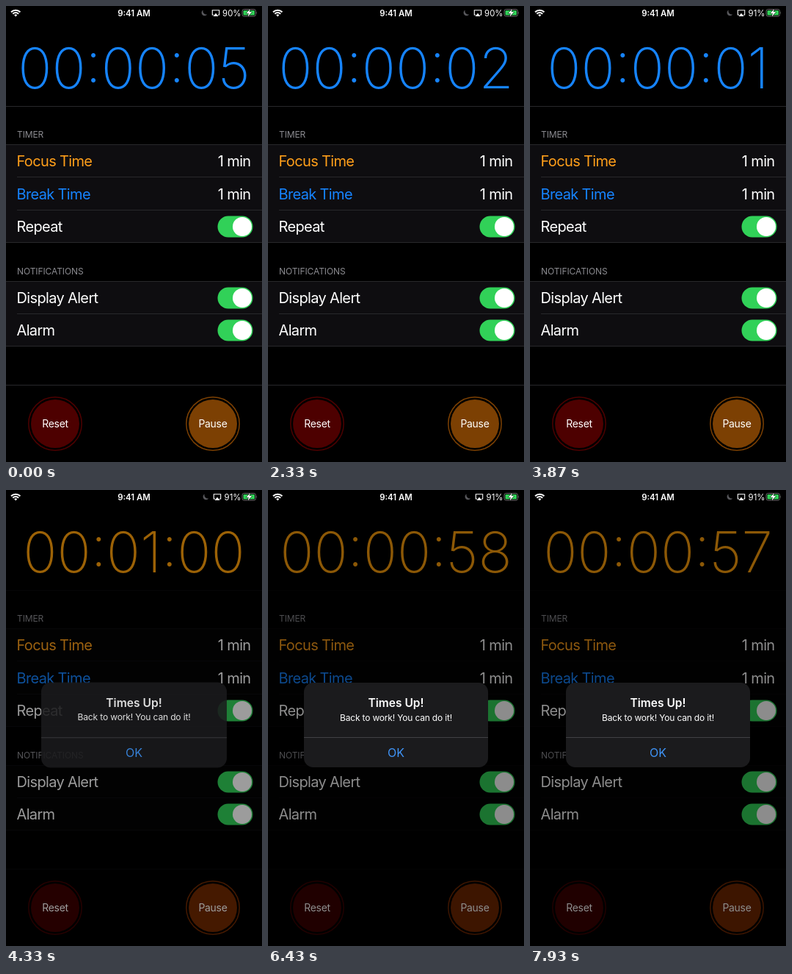
Write an HTML page that moves like this. It is 349 by 620 pixels and loops after 8 s.

```html
<!DOCTYPE html>
<html lang="en">
<head>
<meta charset="utf-8">
<title>Focus timer</title>
<style>
  html, body { margin: 0; height: 100%; background: #000; overflow: hidden; }
  svg { --shown: 0; display: block; width: 349px; height: 620px; font-family: Inter, Roboto, sans-serif; fill: #fff; }
  .middle { text-anchor: middle; }
  .end { text-anchor: end; }
  .row { font-size: 20px; letter-spacing: -.65px; }
  .head { font-size: 12px; letter-spacing: -.1px; fill: #8b8b90; }
  .label { font-size: 14px; letter-spacing: -.3px; text-anchor: middle; }
  .status { font-size: 11.4px; }
  .cell { fill: #0e0d10; }
  .line { stroke: #28282b; stroke-width: 1; }
  .cell, .line { opacity: calc(1 - .85 * var(--shown)); }
  .reset { --tint: color-mix(in srgb, #4d0000, #3a0000 calc(100% * var(--shown))); }
  .pause { --tint: color-mix(in srgb, #7c4003, #6e2600 calc(100% * var(--shown))); }
  .disc { fill: var(--tint); }
  .ring { fill: none; stroke: var(--tint); stroke-width: 1.5; }
  #dim { fill: #000; opacity: calc(.45 * var(--shown)); }
  #alert { opacity: var(--shown); }
  #clock { font-size: 76.5px; font-weight: 240; font-optical-sizing: none; }
</style>
</head>
<body>
<svg id="stage" viewBox="0 0 349 620">
  <defs>
    <g id="switch">
      <rect x="288.5" y="-14.5" width="48" height="29" rx="14.5" fill="#31d158"/>
      <circle cx="322" r="13"/>
    </g>
  </defs>

  <text id="clock" class="middle" x="174.5" y="112"></text>

  <path class="cell" d="M0 188h349v134H0zM0 374h349v89H0z"/>
  <path class="line" d="M0 136.5h349M0 188.5h349M15 232.5h334M15 277.5h334M0 321.5h349M0 374.5h349M15 418.5h334M0 462.5h349M0 515.5h349"/>

  <text class="head" x="15" y="179">TIMER</text>
  <text class="row" x="14.5" y="218" fill="#ff9f1a">Focus Time</text>
  <text class="row end" x="333.5" y="218">1 min</text>
  <text class="row" x="14.5" y="263" fill="#1684ff">Break Time</text>
  <text class="row end" x="333.5" y="263">1 min</text>
  <text class="row" x="14.5" y="307">Repeat</text>
  <use href="#switch" y="300"/>

  <text class="head" x="15" y="365">NOTIFICATIONS</text>
  <text class="row" x="14.5" y="404">Display Alert</text>
  <use href="#switch" y="397"/>
  <text class="row" x="14.5" y="448">Alarm</text>
  <use href="#switch" y="441"/>

  <g class="reset">
    <circle class="ring" cx="67" cy="568" r="36.2"/>
    <circle class="disc" cx="67" cy="568" r="33"/>
    <text class="label" x="67" y="573">Reset</text>
  </g>
  <g class="pause">
    <circle class="ring" cx="282" cy="568" r="36.2"/>
    <circle class="disc" cx="282" cy="568" r="33"/>
    <text class="label" x="282" y="573">Pause</text>
  </g>

  <rect id="dim" width="349" height="620"/>

  <g class="status">
    <path d="M7 8.3a8.6 8.6 0 0 1 12.4 0M9.3 10.7a5.4 5.4 0 0 1 7.8 0" fill="none" stroke="#fff" stroke-width="2"/>
    <path d="M13.2 14.4l-2-2.1a2.8 2.8 0 0 1 4 0z"/>
    <text class="middle" x="174.5" y="13.5" font-weight="600">9:41 AM</text>
    <g id="icons">
      <path d="M268.6 5.4a4.2 4.2 0 1 0 5.6 6a4.7 4.7 0 0 1-5.6-6z" fill="#58585c"/>
      <path d="M283 12h-1.7v-6.3h9.4V12H289" fill="none" stroke="#fff" stroke-width="1.1"/>
      <path d="M286 9.7l3.6 4.3h-7.2z"/>
    </g>
    <text id="charge" class="end" x="320.5" y="13.5"></text>
    <rect x="322" y="4.5" width="18.5" height="9.5" rx="2.6" fill="none" stroke="#6a6a6a"/>
    <rect x="323.5" y="6" width="15.5" height="6.5" rx="1.2" fill="#32d158"/>
    <path d="M341.5 7.7q1.5 1.5 0 3z" fill="#6a6a6a"/>
    <path d="M333 3.8l-5.4 6.1h3.2l-1.2 4.8 5.6-6.6h-3.4z" stroke="#000" stroke-width="1" paint-order="stroke"/>
  </g>

  <g id="alert">
    <rect x="49" y="262" width="251" height="115" rx="12.5" fill="#1b1b1d"/>
    <path d="M49 336.5h251" stroke="#414144"/>
    <g class="middle">
      <text x="174.5" y="295" font-size="15.5" font-weight="600">Times Up!</text>
      <text x="174.5" y="313.5" font-size="12" letter-spacing="-.18">Back to work! You can do it!</text>
      <text x="174.5" y="363" font-size="16" fill="#3f94f7">OK</text>
    </g>
  </g>
</svg>

<script>
const LOOP = 8000, FIRST_TICK = 130, CHARGED = 2600, BREAK_SECONDS = 5, FOCUS_SECONDS = 60;
const ALERT = FIRST_TICK + (BREAK_SECONDS - 1) * 1000;
const el = id => document.getElementById(id);
const stage = el('stage'), clock = el('clock'), icons = el('icons'), charge = el('charge'), alertBox = el('alert');
const pad = n => String(n).padStart(2, '0');

function setText(node, text) {
  if (node.textContent !== text) node.textContent = text;
}

function draw(time) {
  const ticks = Math.floor((time - FIRST_TICK) / 1000) + 1;
  const focusing = ticks >= BREAK_SECONDS;
  const left = focusing ? FOCUS_SECONDS + BREAK_SECONDS - ticks : BREAK_SECONDS - ticks;
  setText(clock, `00:${pad(Math.floor(left / 60))}:${pad(left % 60)}`);
  clock.setAttribute('fill', focusing ? '#ff9f0a' : '#1684ff');

  const charged = time >= CHARGED;
  setText(charge, charged ? '91%' : '90%');
  icons.setAttribute('transform', `translate(${charged ? 2 : 0})`);

  // The alert shrinks into place while it and the dimming fade in.
  const age = time - ALERT;
  const shown = age < 0 ? 0 : 1 - Math.exp(-age / 100);
  const scale = 1 + 0.2 * Math.exp(-Math.max(age, 0) / 62);
  stage.style.setProperty('--shown', shown.toFixed(4));
  alertBox.setAttribute('transform', `translate(174.5 319.5) scale(${scale}) translate(-174.5 -319.5)`);
}

const start = performance.now();
function frame() {
  draw((performance.now() - start) % LOOP);
  requestAnimationFrame(frame);
}
frame();
</script>
</body>
</html>
```
